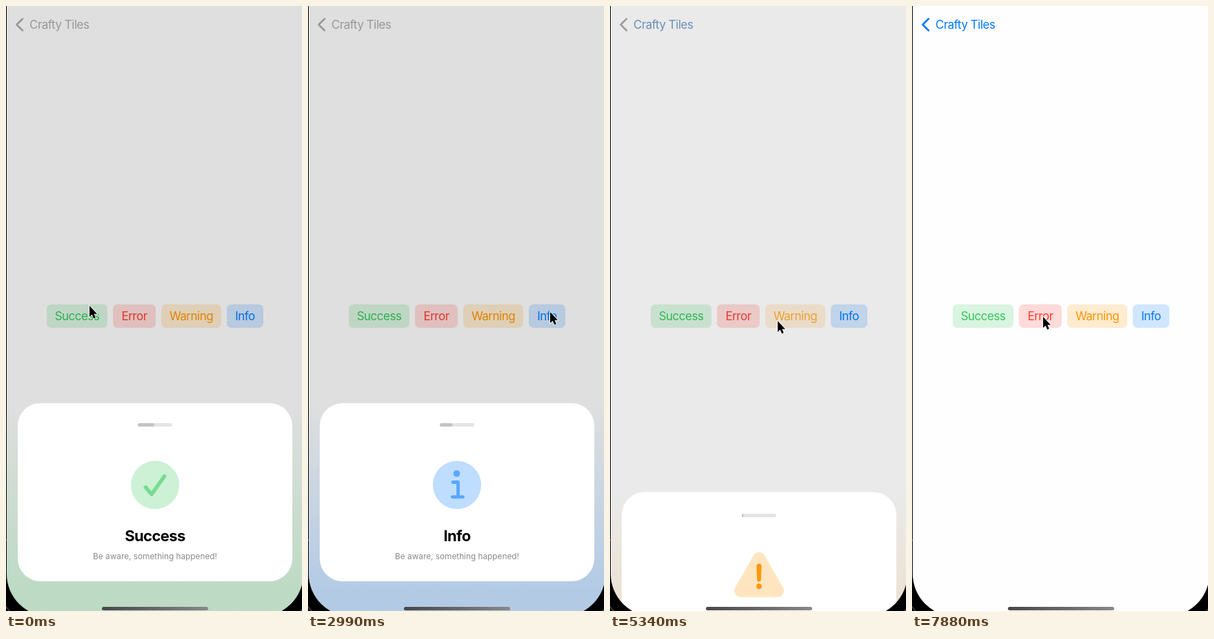
These frames come from a looping animation (429 by 876 pixels, 8000 ms). An HTML page:

```html
<!DOCTYPE html>
<html lang="en">
<head>
<meta charset="utf-8">
<title>Alert sheets</title>
<style>
  html, body { margin: 0; width: 100%; height: 100%; overflow: hidden; background: #000; }
  svg { display: block; width: 429px; height: 876px; font-family: Inter, Roboto, sans-serif; }
  .label { font-size: 17px; letter-spacing: -.5px; }
  .title { font-size: 22px; font-weight: 700; letter-spacing: -.6px; }
  .note { font-size: 11.8px; fill: #8a8a8e; }
  .mid { text-anchor: middle; }
  .line { fill: none; stroke-linecap: round; stroke-linejoin: round; }
</style>
</head>
<body>
<svg viewBox="0 0 429 876">
  <defs>
    <clipPath id="screen"><rect x="1" y="-100" width="430" height="984" rx="62"/></clipPath>
    <linearGradient id="fade" x2="0" y2="1">
      <stop id="fadeTop" stop-opacity="0"/>
      <stop id="fadeEnd" offset=".9" stop-opacity=".2"/>
    </linearGradient>
    <linearGradient id="homeFill">
      <stop stop-color="#484848"/><stop offset=".5" stop-color="#666"/><stop offset="1" stop-color="#888"/>
    </linearGradient>
  </defs>
  <rect width="429" height="876"/>
  <g class="line" stroke="#3c4043" stroke-width="1.5">
    <circle cx="63" cy="822" r="79"/><circle cx="369" cy="822" r="79"/>
  </g>
  <g clip-path="url(#screen)">
    <rect width="429" height="876" fill="#fefefe"/>
    <path id="back" class="line" d="M24 18.5 15.5 27 24 35.5" stroke-width="2.5"/>
    <text id="nav" class="label" x="34" y="33">Crafty Tiles</text>
    <g id="buttons"></g>
    <rect id="dim" width="429" height="876"/>
    <rect id="tint" y="575" width="429" height="301" fill="url(#fade)"/>
    <g id="sheet">
      <rect x="17" y="575" width="398" height="258" rx="33" fill="#fff"/>
      <g id="meter">
        <rect x="191" y="604" width="50" height="5" rx="2.5" fill="#e4e4e4"/>
        <rect id="bar" x="191" y="604" height="5" rx="2.5" fill="#c4c4c4"/>
      </g>
      <g id="icon"></g>
      <g id="words" class="mid">
        <text id="title" class="title" x="216" y="775"></text>
        <text class="note" x="216" y="801">Be aware, something happened!</text>
      </g>
    </g>
  </g>
  <rect x="139" y="870" width="154" height="5" rx="2.5" fill="url(#homeFill)"/>
  <path id="cursor" d="M0 0V16L3.6 12.7 6.1 18.4 8.8 17.2 6.4 11.7H11Z" stroke="#fff" stroke-width="1.6" paint-order="stroke"/>
</svg>
<script>
const $ = id => document.getElementById(id);
const set = (id, attrs) => {
  for (const k in attrs) $(id).setAttribute(k, attrs[k]);
};
const clamp = x => Math.min(1, Math.max(0, x));
const smooth = x => x * x * (3 - 2 * x);
const mix = (a, b, k) => `rgb(${a.map((v, i) => Math.round(v + (b[i] - v) * k))})`;

const LOOP = 8000, LIFE = 2240, HIDE = 300, TRAVEL = 370;
const BLUE = [0, 122, 255], GRAY = [172, 172, 172];
const disc = '<circle cx="216" cy="693.5" r="35" fill="currentColor" opacity=".25"/>';

const kinds = {
  Success: {
    x: 59, w: 88, color: '#34c759',
    icon: disc + '<path class="line pulse" d="M202.5 697 211 707 229.5 681" stroke="currentColor" stroke-width="5.6"/>'
  },
  Error: { x: 155, w: 62, color: '#ff3b30' },
  Warning: {
    x: 225, w: 87, color: '#ff9500',
    icon: `<path d="M216 671 189 718H243Z" fill="#ffe5bf" stroke="#ffe5bf" stroke-width="18" stroke-linejoin="round"/>
      <g class="pulse" fill="currentColor"><path d="M212.3 682.5a3.7 3.7 0 0 1 7.4 0L218.8 702a2.8 2.8 0 0 1-5.6 0Z"/><circle cx="216" cy="711.5" r="3.9"/></g>`
  },
  Info: {
    x: 320, w: 53, color: '#007aff',
    icon: disc + `<g class="pulse"><circle cx="215.5" cy="677" r="4.8" fill="currentColor"/>
      <path class="line" d="M210 689.5H217.5V710.8M209.3 710.8H224.5" stroke="currentColor" stroke-width="4.8"/></g>`
  }
};

// name and moment each sheet is called up
const shows = [['Success', -1170], ['Info', 2095], ['Warning', 5210]];

// time, x, y of the pointer
const path = [
  [0, 121, 434], [1260, 121, 434], [1780, 351, 443], [4350, 351, 443], [4600, 346, 452],
  [4650, 346, 452], [5100, 243, 456], [7740, 243, 456], [7870, 190, 450], [LOOP, 190, 450]
];

$('buttons').innerHTML = Object.entries(kinds).map(([name, { x, w, color }]) =>
  `<g id="${name}" fill="${color}"><rect x="${x}" y="432" width="${w}" height="34" rx="6.5" opacity=".18"/>
   <text class="label mid" x="${x + w / 2}" y="455">${name}</text></g>`).join('');

let shown;
function load(name) {
  if (name === shown) return;
  shown = name;
  const { color, icon } = kinds[name];
  $('icon').innerHTML = icon;
  $('icon').style.color = color;
  $('title').textContent = name;
  set('fadeTop', { 'stop-color': color });
  set('fadeEnd', { 'stop-color': color });
  const low = name === 'Warning';   // its shorter icon tightens the stack
  set('meter', { transform: `translate(0 ${low ? 2.5 : 0})` });
  set('words', { transform: `translate(0 ${low ? -2.5 : 0})` });
}

function draw(t) {
  const [name, start] = shows.filter(s => s[1] <= t).pop();
  const age = t - start;
  load(name);

  const s = age * .017;             // critically damped spring
  const leaving = age > LIFE;
  const open = leaving ? 1 - smooth(clamp((age - LIFE) / HIDE)) : 1 - (1 + s) * Math.exp(-s);
  const shift = `translate(0 ${(1 - open) * TRAVEL})`;

  set('sheet', { transform: shift });
  set('tint', { transform: shift, opacity: .5 + open / 2 });
  set('dim', { opacity: .12 * open });
  set('bar', { width: 50 * clamp(age * .00041) });
  set('nav', { fill: mix(BLUE, GRAY, open) });
  set('back', { stroke: mix(BLUE, GRAY, leaving ? open : clamp(open * 1.5)) });
  $('icon').querySelector('.pulse').style.opacity = .75 + .23 * Math.cos(age / 2050 * 2 * Math.PI);

  for (const id in kinds)
    set(id, { opacity: id === name ? 1 - .35 * clamp(1 - age / 350) : 1 });

  const i = path.findIndex(p => p[0] > t);
  const [a, b] = [path[i - 1], path[i]];
  const k = smooth((t - a[0]) / (b[0] - a[0]));
  set('cursor', { transform: `translate(${a[1] + (b[1] - a[1]) * k} ${a[2] + (b[2] - a[2]) * k})` });
}

const begin = performance.now();
function tick() {
  draw((performance.now() - begin) % LOOP);
  requestAnimationFrame(tick);
}
tick();
</script>
</body>
</html>
```
